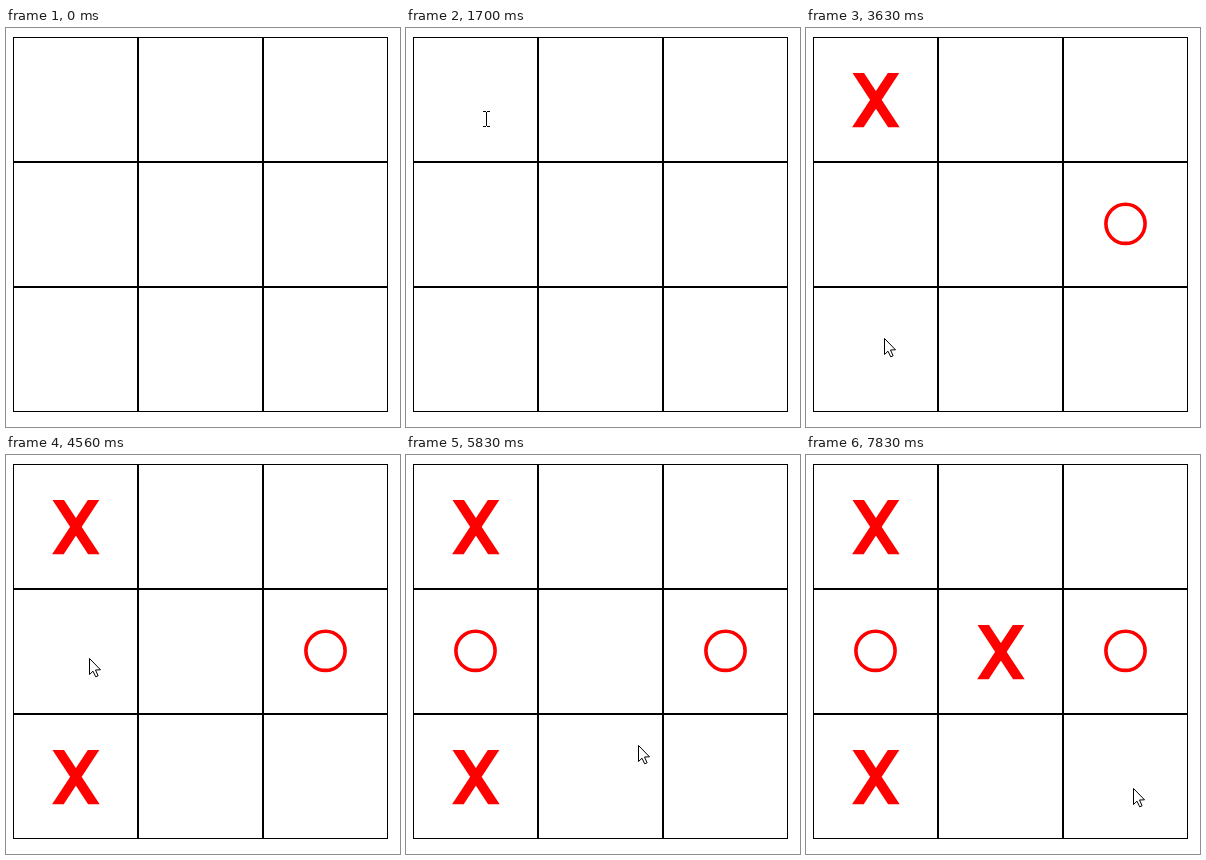
Write an HTML page with a canvas that moves like this. It is 394 px wide and 399 px high and loops after 8000 ms.

```html
<!DOCTYPE html>
<html lang="en">
<head>
<meta charset="utf-8">
<title>Noughts and crosses</title>
<style>
html, body { margin: 0; width: 100%; height: 100%; overflow: hidden; background: #fff; }
canvas { display: block; }
</style>
</head>
<body>
<canvas id="board" width="394" height="399"></canvas>
<script>
const ctx = document.getElementById('board').getContext('2d');
const LOOP = 8000;
const STEP = 66;
const CELL = 125;
const LEFT = 7;
const TOP = 9;

// A mark is set by a click and painted one step later
const marks = [];
function click(placed, kind, col, row) {
  marks.push({ placed, kind, col, row });
}
click(1700, 'X', 0, 0);
click(3100, 'O', 2, 1);
click(3900, 'X', 0, 2);
click(5230, 'O', 0, 1);
click(6830, 'X', 1, 1);

// Each move goes on from the last place; bends are [step, x, y]
const moves = [];
let place = [180, 395];
function move(start, length, target, ...bends) {
  const count = Math.round(length / STEP) + 1;
  const hold = marks.some(m => m.placed === start) ? 2 : 0;
  const keys = [[hold, ...place], ...bends, [count, ...target]];
  moves.push({ start, length, count, keys });
  place = target;
}
move(900, 600, [80, 91], [1, 175, 371], [4, 112, 220], [8, 62, 104]);
move(1700, 600, [268, 83], [5, 150, 114]);
move(2560, 400, [291, 200], [1, 266, 120], [3, 283, 207]);
move(3100, 600, [76, 312], [5, 190, 256], [9, 78, 310]);
move(3900, 260, [95, 314]);
move(4300, 460, [81, 197], [2, 94, 268], [5, 83, 203]);
move(4900, 130, [81, 195]);
move(5230, 600, [232, 290]);
move(6230, 400, [201, 198], [6, 196, 190]);
move(7160, 670, [327, 333], [5, 258, 262]);

function tangent(keys, i, axis) {
  if (i === 0 || i === keys.length - 1) return 0;
  const a = keys[i - 1], b = keys[i + 1];
  return (b[axis] - a[axis]) / (b[0] - a[0]);
}

function along(keys, step, axis) {
  if (step <= keys[0][0]) return keys[0][axis];
  let i = 0;
  while (i < keys.length - 2 && step > keys[i + 1][0]) i++;
  const a = keys[i], b = keys[i + 1], span = b[0] - a[0];
  const u = Math.min(1, (step - a[0]) / span), v = 1 - u;
  return v * v * (1 + 2 * u) * a[axis] + u * u * (3 - 2 * u) * b[axis]
    + span * u * v * (v * tangent(keys, i, axis) - u * tangent(keys, i + 1, axis));
}

function pointerAt(t) {
  if (t >= 500 && t < 560) return [373, 384];
  const now = moves.filter(m => m.start <= t).pop();
  if (!now) return null;
  const done = (t - now.start + 5) / now.length;
  const step = Math.min(now.count, Math.floor(done * (now.count - 1)) + 1);
  return [1, 2].map(axis => Math.round(along(now.keys, step, axis)));
}

function overMark(t, [x, y]) {
  return marks.some(m => t >= m.placed
    && Math.abs(x - 69.5 - m.col * CELL) < (m.kind === 'X' ? 27 : 31)
    && Math.abs(y - 72 - m.row * CELL) < 43);
}

function outline(points) {
  ctx.beginPath();
  points.forEach(p => ctx.lineTo(...p));
  ctx.closePath();
}

function drawGrid() {
  ctx.strokeStyle = '#000';
  ctx.lineWidth = 1;
  for (let row = 0; row < 3; row++) {
    for (let col = 0; col < 3; col++) {
      ctx.strokeRect(LEFT + col * CELL + 0.5, TOP + row * CELL + 0.5, CELL - 1, CELL - 1);
    }
  }
}

function drawCross() {
  for (const side of [-1, 1]) {
    outline([[-23.4, -27.2], [-11.9, -27.2], [23.8, 27.2], [12.2, 27.2]]
      .map(([x, y]) => [69.9 + side * x, 72.1 + y]));
    ctx.fill();
  }
}

function drawNought() {
  ctx.lineWidth = 3.6;
  ctx.beginPath();
  ctx.arc(69.5, 70.8, 19.6, 0, Math.PI * 2);
  ctx.stroke();
}

function drawMark({ kind, col, row }) {
  ctx.save();
  ctx.translate(col * CELL, row * CELL);
  ctx.fillStyle = ctx.strokeStyle = '#f00';
  (kind === 'X' ? drawCross : drawNought)();
  ctx.restore();
}

function drawArrow(x, y) {
  ctx.save();
  ctx.translate(x + 0.5, y + 0.5);
  outline([[0, 0], [0, 16], [3.5, 12.7], [6.2, 18.3], [8.6, 17.3], [6, 11.5], [11, 11.3]]);
  ctx.fillStyle = '#fff';
  ctx.fill();
  ctx.strokeStyle = '#000';
  ctx.lineWidth = 1;
  ctx.stroke();
  ctx.restore();
}

function drawBeam(x, y) {
  ctx.fillStyle = '#000';
  ctx.fillRect(x, y - 7, 1, 14);
  for (const edge of [y - 8, y + 7]) {
    ctx.fillRect(x - 3, edge, 3, 1);
    ctx.fillRect(x + 1, edge, 3, 1);
  }
}

function draw(t) {
  ctx.fillStyle = '#fff';
  ctx.fillRect(0, 0, 394, 399);
  drawGrid();
  marks.filter(m => t >= m.placed + 60).forEach(drawMark);
  const pointer = pointerAt(t);
  if (pointer) (overMark(t, pointer) ? drawBeam : drawArrow)(...pointer);
}

const begin = performance.now();
function tick() {
  draw((performance.now() - begin) % LOOP);
  requestAnimationFrame(tick);
}
tick();
</script>
</body>
</html>
```
